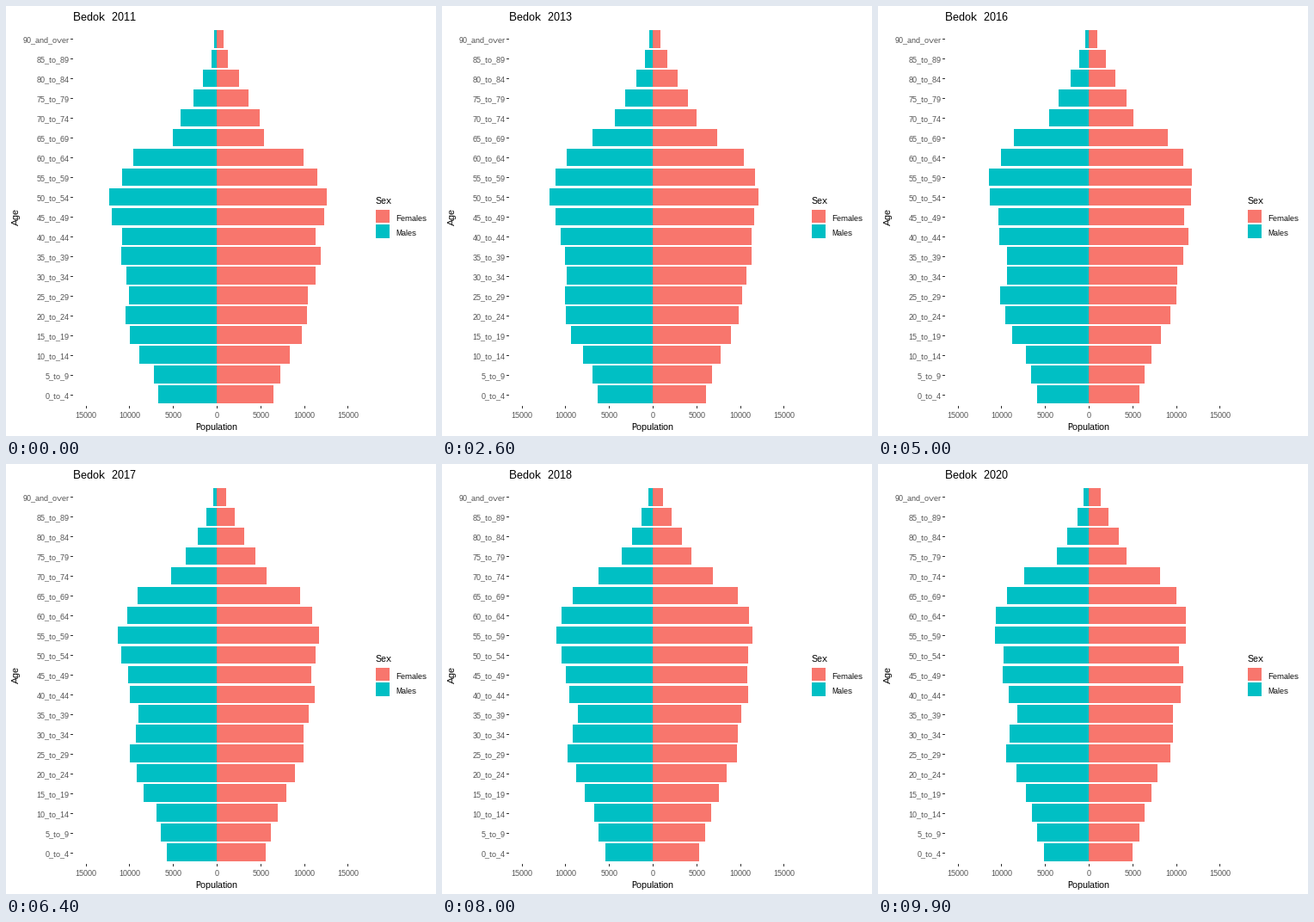
Animation, 500 px wide and 500 px high, one loop 10000 ms. Source, as a matplotlib script:

```python
import numpy as np
import matplotlib.pyplot as plt
from matplotlib.animation import FuncAnimation
from matplotlib.patches import Rectangle

plt.rcParams.update({
    "font.family": "Liberation Sans",
    "text.hinting": "native",
    "text.hinting_factor": 1,
})

STAGE, DPI = 500, 100
FRAMES, INTERVAL = 100, 100
FIRST_YEAR, SPAN, STEPS = 2011, 9, 11

RED, TEAL = "#F8766D", "#00BFC4"
DARK, GREY = "#333333", "#4D4D4D"

ZERO, PER_5000 = 245.4, 50.8
MID = 245
ROW_TOP, ROW_STEP, BAR = 38.3, 22.95, 20.56
AGES = ["90_and_over"] + [f"{a}_to_{a + 4}" for a in range(85, -1, -5)]
ROWS = np.arange(len(AGES))

# Bar lengths in the first year, oldest group first; the last two values
# are the groups still to be born.
MALES = [3, 6, 16, 27, 42, 51, 97, 110, 125, 122, 110, 111, 105, 102,
         106, 101, 90, 73, 68, 61, 52]
FEMALES = [8, 13, 26, 37, 50, 55, 101, 117, 128, 125, 115, 121, 115, 106,
           105, 99, 85, 74, 66, 60, 51]


def bump(centre, width):
    return np.exp(-((ROWS - centre) / width) ** 2)


def kept(oldest, slope, plateau, dip):
    """Share of each group that remains after the whole span."""
    aged = oldest + slope * ROWS
    young = np.clip(plateau + 0.02 * (ROWS - 8), plateau, 0.96)
    leaving = dip * bump(11.2, 1.2) + 0.05 * bump(14, 0.6)
    return np.minimum(aged, young) - leaving


KEPT_MALES = kept(0.43, 0.105, 0.885, 0.14)
KEPT_FEMALES = kept(0.58, 0.08, 0.9, 0.05)


def lengths(start, share, t):
    """Each five-year group grows into the next older row and thins out."""
    shifted = np.interp(ROWS + t / 5, np.arange(len(start)), start)
    return np.round(shifted * share ** (t / SPAN))


fig = plt.figure(figsize=(STAGE / DPI, STAGE / DPI), dpi=DPI,
                 facecolor="white")
ax = fig.add_axes([0, 0, 1, 1])
ax.set(xlim=(0, STAGE), ylim=(STAGE, 0))
ax.axis("off")


def box(x0, y0, x1, y1, color):
    return ax.add_patch(Rectangle((x0, y0), x1 - x0, y1 - y0, fc=color,
                                  lw=0, antialiased=False))


def label(x, y, text, px, color="black", **kw):
    return ax.text(x, y, text, fontsize=px * 72 / DPI, color=color,
                   va="baseline", **kw)


left_bars, right_bars = [], []
for row, age in enumerate(AGES):
    y = ROW_TOP + row * ROW_STEP
    y0, y1 = round(y - BAR / 2), round(y + BAR / 2)
    left_bars.append(box(MID, y0, MID, y1, TEAL))
    right_bars.append(box(MID, y0, MID, y1, RED))
    tick = round(y + 0.2)
    box(75, tick, 78, tick + 1, DARK)
    label(73.5, round(y + 4.2), age, 9, GREY, ha="right")

for k in range(-3, 4):
    x = ZERO + k * PER_5000
    box(int(x), 465, int(x) + 1, 468, DARK)
    label(x, 479, str(abs(k) * 5000), 9, GREY, ha="center")

label(244.5, 493, "Population", 11, ha="center")
label(15, 245, "Age", 11, ha="center", rotation=90,
      rotation_mode="anchor")

label(430, 230, "Sex", 11)
box(430, 237, 446, 252, RED)
box(430, 254, 446, 270, TEAL)
label(453, 250, "Females", 9)
label(453, 267, "Males", 9)

title = label(78, 17, "", 13)


def update(n):
    t = n / STEPS
    for bar, length in zip(left_bars, lengths(MALES, KEPT_MALES, t)):
        bar.set_x(MID - length)
        bar.set_width(length)
    for bar, length in zip(right_bars, lengths(FEMALES, KEPT_FEMALES, t)):
        bar.set_width(length)
    title.set_text(f"Bedok  {FIRST_YEAR + round(t)}")
    return [*left_bars, *right_bars, title]


anim = FuncAnimation(fig, update, frames=FRAMES, interval=INTERVAL,
                     repeat=True, repeat_delay=0)
plt.show()
```
